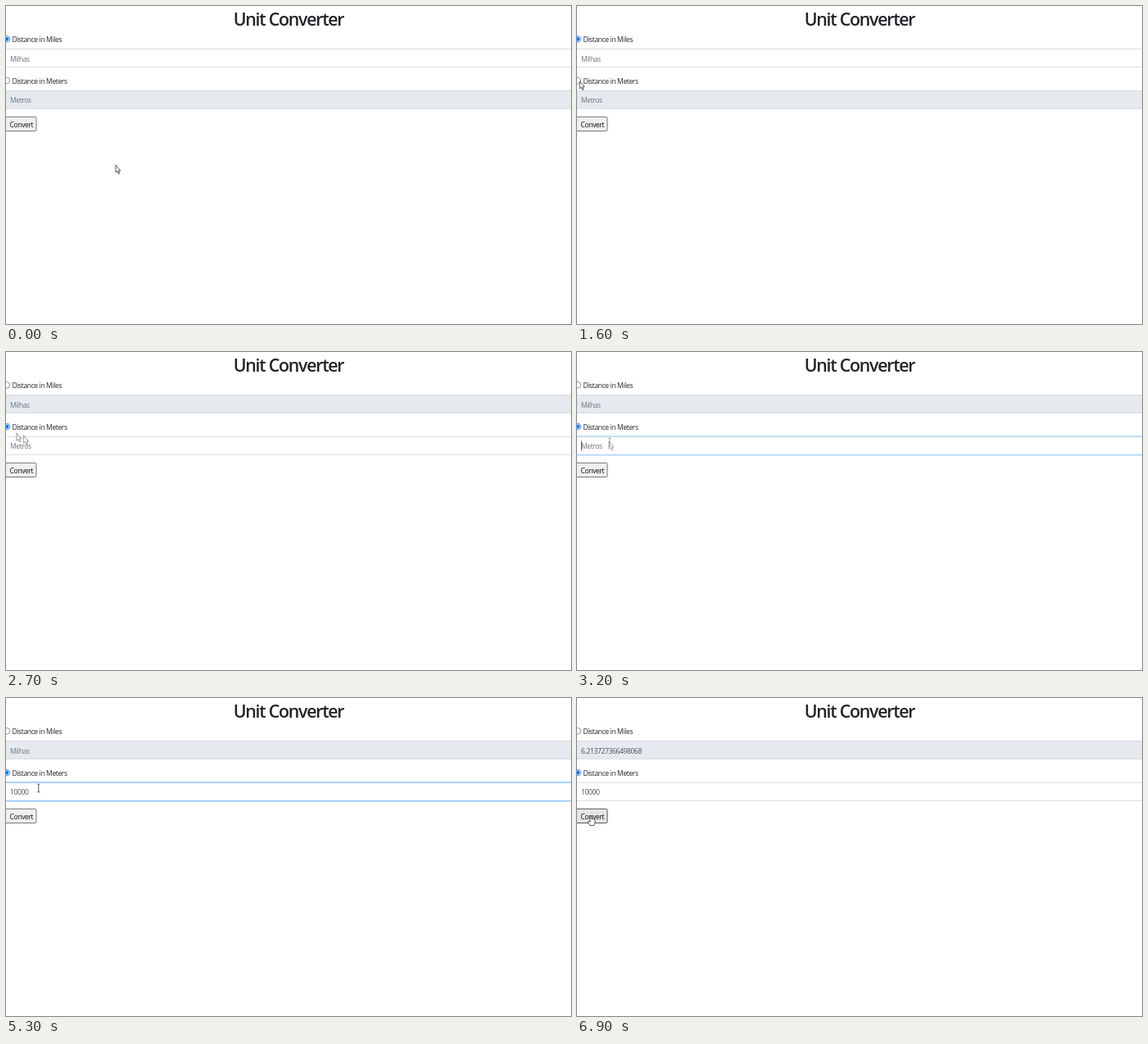
Write an HTML page with a canvas that moves like this. It is 690 px wide and 388 px high and loops after 8200 ms.

```html
<!DOCTYPE html>
<html lang="en">
<head>
<meta charset="utf-8">
<title>Unit Converter</title>
<style>
  html, body { margin: 0; width: 100%; height: 100%; overflow: hidden; background: #fff; }
  canvas { display: block; }
</style>
</head>
<body>
<canvas id="stage" width="690" height="388"></canvas>
<script>
const ctx = document.getElementById('stage').getContext('2d');
const LOOP = 8200, STEP = 100;
const KEYS = [3900, 4200, 4500, 4700, 4800];
const FONT = '"Open Sans", "Noto Sans", sans-serif';
const ARROW = new Path2D('M0 0V9.2L2 7.5L3.4 10.8L4.8 10.2L3.5 7H5.8Z');
const HAND = new Path2D('M-1 7V1Q0-.8 1 1V4.6Q2-.1+3.4 2.6 5 5.2V9Q4.8 11 3.6 12.5H-1.2Q-2.2 10.5-3.7 8.2Q-3.6 6.4-1 8.2Z'.replace('Q2-.1+3.4 2.6 5 5.2', 'Q3 4 3.4 5.2Q4.8 4.8 5 6'));
const BEAM = new Path2D('M-1.6 0Q0 0 0 1Q0 0 1.6 0M0 1V9M-1.6 10Q0 10 0 9Q0 10 1.6 10');

// Pointer track: time, x, y
const TRACK = [
  [300, 134, 194], [500, 116, 178], [700, 62, 128], [800, 42, 111], [900, 33, 108],
  [1200, 4, 95], [1800, 3, 90], [2400, 3, 90], [2600, 13, 99], [2900, 39, 108],
  [5400, 39, 108], [5700, 36, 120], [6000, 24, 137], [6200, 17, 143]
];

const ramp = (t, from, to) => Math.min(1, Math.max(0, (t - from) / (to - from)));
const mix = (a, b, p) => `rgb(${a.map((v, i) => Math.round(v + (b[i] - v) * p))})`;

function pointerAt(t) {
  const next = TRACK.findIndex(k => k[0] > t);
  if (next === 0) return TRACK[0].slice(1);
  if (next < 0) return TRACK[TRACK.length - 1].slice(1);
  const a = TRACK[next - 1], b = TRACK[next], p = ramp(t, a[0], b[0]);
  return [a[1] + (b[1] - a[1]) * p, a[2] + (b[2] - a[2]) * p];
}

function text(str, x, y, color, size = 8.55, weight = 400, spacing = -.045) {
  ctx.font = `${weight} ${size}px ${FONT}`;
  ctx.letterSpacing = `${spacing * size}px`;
  ctx.fillStyle = color;
  ctx.fillText(str, x, y);
}

function radio(y, checked) {
  const oval = (rx, ry) => { ctx.beginPath(); ctx.ellipse(1.2, y, rx, ry, 0, 0, 7); };
  ctx.lineWidth = .8;
  oval(3.4, 3.8);
  ctx.strokeStyle = mix([118, 118, 118], [0, 117, 255], checked);
  ctx.stroke();
  ctx.globalAlpha = checked;
  oval(2.1, 2.4);
  ctx.fillStyle = '#0075ff';
  ctx.fill();
  ctx.globalAlpha = 1;
}

function input(y, disabled, focus, value, placeholder) {
  if (focus) {
    ctx.fillStyle = `rgba(0,123,255,${.25 * focus})`;
    ctx.fillRect(0, y - 1.3, 690, 25.3);
  }
  ctx.fillStyle = mix([206, 212, 218], [128, 189, 255], focus);
  ctx.fillRect(0, y, 690, 22.7);
  ctx.fillStyle = mix([255, 255, 255], [229, 234, 239], disabled);
  ctx.fillRect(0, y + .8, 690, 21.1);
  text(value || placeholder, 5, y + 15.5, value ? '#495057' : '#6c757d');
}

function button(fill, border) {
  ctx.beginPath();
  ctx.roundRect(-4, 135.3, 41, 17.2, 1.5);
  ctx.fillStyle = fill;
  ctx.fill();
  ctx.lineWidth = 1;
  ctx.strokeStyle = border;
  ctx.stroke();
  text('Convert', 4.5, 147.5, '#111');
}

function draw(shape, [x, y], alpha = 1) {
  ctx.save();
  ctx.translate(x, y);
  ctx.globalAlpha = alpha;
  ctx.lineWidth = .9;
  ctx.lineJoin = 'round';
  ctx.strokeStyle = '#444';
  if (shape !== BEAM) {
    ctx.fillStyle = '#fff';
    ctx.fill(shape);
  }
  ctx.stroke(shape);
  ctx.restore();
}

function pointer(t) {
  const pos = pointerAt(t), before = pointerAt(t - STEP);
  const overField = t >= 2900 && pos[1] < 126;
  const shape = overField ? BEAM : pos[1] > 135 && t > 5400 ? HAND : ARROW;
  const fast = Math.hypot(pos[0] - before[0], pos[1] - before[1]) > 4;
  if (t >= 2900 && t < 3400) {
    draw(ARROW, [39, 109], .5);
    draw(BEAM, [39.8, 105], .55);
  } else if (fast && shape === ARROW) {
    draw(ARROW, before, .6);
    draw(ARROW, pos, .6);
  } else {
    draw(shape, overField ? [pos[0] + .8, pos[1] - 3] : pos);
  }
}

function render(t) {
  const swap = ramp(t, 2100, 2300);
  const focus = ramp(t, 3000, 3300) * (1 - ramp(t, 6300, 6500));
  const typed = '10000'.slice(0, KEYS.filter(k => t >= k).length);
  const within = (a, b) => t >= a && t < b;

  ctx.fillStyle = '#fff';
  ctx.fillRect(0, 0, 690, 388);
  ctx.textAlign = 'center';
  text('Unit Converter', 345, 23.5, '#212529', 21.4, 600, -.06);
  ctx.textAlign = 'left';

  radio(40.3, 1 - swap);
  text('Distance in Miles', 7.5, 44, '#212529');
  input(52, swap, 0, t >= 6400 ? '6.213727366498068' : '', 'Milhas');
  radio(91, swap);
  text('Distance in Meters', 7.5, 94.8, '#212529');
  input(102.9, 1 - swap, focus, typed, 'Metros');

  if (within(3100, 3700) || within(3900, 5300) || within(5800, 6300)) {
    ctx.fillStyle = '#333';
    ctx.fillRect(5 + typed.length * 4.5, 108.5, .8, 12);
  }

  const pressed = within(6300, 6400), hover = t >= 6000;
  button(pressed ? '#f5f5f5' : hover ? '#e5e5e5' : '#efefef', pressed ? '#8d8d8d' : hover ? '#555' : '#767676');
  pointer(t);
}

function frame(now) {
  render(Math.floor(now % LOOP / STEP) * STEP);
  requestAnimationFrame(frame);
}
requestAnimationFrame(frame);
</script>
</body>
</html>
```
